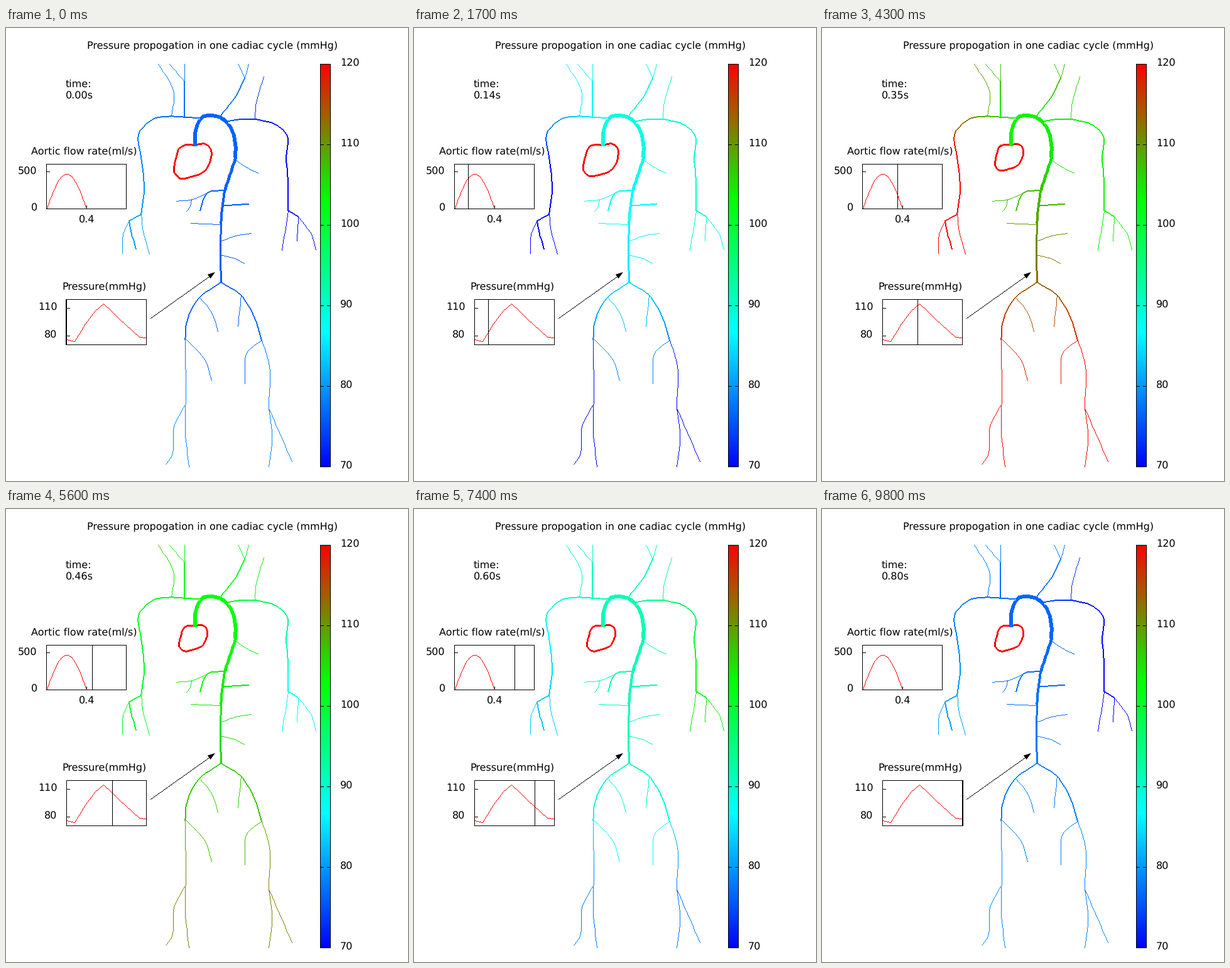
Animation of 640 by 720 pixels, one loop 9900 ms. Source, as a matplotlib script:

```python
import numpy as np
import matplotlib.pyplot as plt
from matplotlib.animation import FuncAnimation
from matplotlib.collections import PolyCollection

W, H, DPI = 640, 720, 80
FRAMES, PERIOD, EJECTION = 99, 0.8, 0.4
LOW, HIGH = 70, 120
RED = (1, 0, 0)

plt.rcParams["font.family"] = "DejaVu Sans"
plt.rcParams["text.hinting"] = "none"
fig = plt.figure(figsize=(W / DPI, H / DPI), dpi=DPI, facecolor="white")
ax = fig.add_axes([0, 0, 1, 1])
ax.axis("off")


def palette(p):
    """Blue, cyan, green, red in three equal linear steps."""
    u = np.clip((np.asarray(p) - LOW) / (HIGH - LOW), 0, 1) * 3
    up, down = np.clip(u, 0, 1), np.clip(u - 2, 0, 1)
    return np.stack([down, up - down, 1 - np.clip(u - 1, 0, 1)], axis=-1)


# ---- crisp strokes made of pixel-aligned bars ----
def bars(pts, width=1):
    """Step along a polyline, one bar across the stroke per pixel."""
    pts = np.floor(np.asarray(pts, float) + 0.5)
    out = []
    for start, end in zip(pts[:-1], pts[1:]):
        dx, dy = np.abs(end - start)
        n = int(max(dx, dy))
        if n == 0:
            continue
        size = max(1, int(width * np.hypot(dx, dy) / n))
        corner = np.floor(np.linspace(start, end, n + 1) + 0.5)
        flat = dx >= dy
        corner[:, 1 if flat else 0] -= size // 2
        w, h = (1, size) if flat else (size, 1)
        out.append(corner[:, None] + np.array([(0, 0), (w, 0), (w, h), (0, h)]))
    return np.concatenate(out) if out else np.empty((0, 4, 2))


def spline(keys, step=7):
    """Points about one step apart on a smooth curve through the keys."""
    k = np.array(keys, float)
    run = np.concatenate([[0], np.cumsum(np.hypot(*np.diff(k, axis=0).T))])
    slope = np.gradient(k, run, axis=0)
    s = np.linspace(0, run[-1], max(2, int(run[-1] / step) + 1))
    i = np.clip(np.searchsorted(run, s, side="right") - 1, 0, len(k) - 2)
    h = (run[i + 1] - run[i])[:, None]
    t = (s - run[i])[:, None] / h
    return ((1 + 2 * t) * (1 - t)**2 * k[i] + t * (1 - t)**2 * h * slope[i]
            + t**2 * (3 - 2 * t) * k[i + 1] + t**2 * (t - 1) * h * slope[i + 1])


def fill_bars(quads, color, zorder):
    patch = PolyCollection(quads, facecolors=color, edgecolors="none",
                           linewidths=0, zorder=zorder)
    ax.add_collection(patch)
    return patch


def line(*pts, color="black", width=1, zorder=3):
    return fill_bars(bars(pts, width), color, zorder)


def box(x0, y0, x1, y1):
    line((x0, y0), (x1, y0), (x1, y1), (x0, y1), (x0, y0), zorder=4)


def label(x, y, s, ha="left"):
    return ax.text(x, y, s, ha=ha, va="baseline", fontsize=16 * 72 / DPI)


# ---- pressure over one cycle at a few sites ----
STEPS = np.arange(FRAMES)
THETA = 2 * np.pi * STEPS / (FRAMES - 1)


def wave(mean, c1, s1, c2, s2):
    """Mean plus the first two harmonics of the heart beat."""
    return (mean + c1 * np.cos(THETA) + s1 * np.sin(THETA)
            + c2 * np.cos(2 * THETA) + s2 * np.sin(2 * THETA))


def mix(a, b, w):
    return a * (1 - w) + b * w


trace = np.array([(97, 495), (109, 498), (126, 470), (141, 450), (155, 438),
                  (167, 449), (180, 462), (200, 480), (212, 491), (223, 492)])

root = wave(92, -13.7, 1.8, -1.8, 0.5)
fork = 80 + 30 * (489 - np.interp(97 + STEPS * 126 / 98, *trace.T)) / 44
ankle = wave(90.2, -23.6, 0.2, 12.2, -9.5)
groin = mix(fork, ankle, 0.3)
neck = wave(93, -13.6, 3.2, -1.3, -2.1)
r_neck = wave(93.7, -15.7, 2.3, 1.2, 0)
l_neck = wave(93.3, -16.4, 4.3, -2.7, 1.6)
r_hand = wave(91.9, -20.7, 0.2, 9.2, -20)
l_hand = wave(92.5, -15.2, 3.9, -15.6, -9.8)
r_shoulder = mix(root, r_hand, 0.15)
l_shoulder = mix(root, l_hand, 0.3)

# ---- vessel tree ----
quads, owners, pressures = [], [], []


def vessel(width, start, end, *keys):
    """Add a curve whose pressure runs from start to end."""
    pts = spline(keys)
    for i in range(len(pts) - 1):
        piece = bars(pts[i:i + 2], width)
        quads.append(piece)
        owners.extend([len(pressures)] * len(piece))
        pressures.append(mix(start, end, (i + 0.5) / (len(pts) - 1)))


def branch(width, site, *keys):
    vessel(width, site, site, *keys)


def aorta_at(w):
    return mix(root, fork, w)


# neck and head
vessel(1, r_shoulder, r_neck, (263, 140), (267, 103), (242, 57))
vessel(2, root, neck, (284, 141), (284, 85))
branch(1, neck, (284, 85), (284, 57))
branch(1, neck, (284, 85), (260, 57))
vessel(2, root, neck, (342, 139), (368, 104), (380, 79))
branch(1, neck, (380, 79), (386, 57))
branch(1, neck, (380, 79), (369, 57))
vessel(1, l_shoulder, l_neck, (396, 145), (397, 125), (410, 77))

# arm on the left side of the picture
vessel(2, root, r_shoulder, (308, 143), (263, 140))
vessel(2, r_shoulder, r_hand, (263, 140), (236, 144), (212, 166), (215, 205),
       (220, 255), (215, 296))
branch(2, r_hand, (215, 296), (196, 306))
branch(1, r_hand, (196, 306), (187, 325), (185, 358))
branch(2, r_hand, (196, 306), (199, 323), (207, 351))
branch(1, r_hand, (215, 296), (217, 318), (228, 359))

# arm on the right side of the picture
vessel(2, root, l_shoulder, (351, 149), (365, 146), (396, 145))
vessel(2, l_shoulder, l_hand, (396, 145), (428, 153), (448, 171), (446, 205),
       (449, 240), (449, 290))
branch(2, l_hand, (449, 290), (465, 300))
branch(1, l_hand, (465, 300), (463, 338))
branch(1, l_hand, (465, 300), (487, 330), (493, 352))
branch(1, l_hand, (449, 290), (446, 310), (439, 353))

# trunk
branch(1, aorta_at(.15), (366, 210), (380, 220), (401, 230))
branch(2, aorta_at(.4), (349, 258), (320, 262), (309, 290))
branch(1, aorta_at(.4), (320, 262), (295, 272), (271, 275))
branch(1, aorta_at(.4), (295, 272), (294, 281), (287, 291))
branch(2, aorta_at(.5), (347, 282), (386, 280))
branch(1, aorta_at(.6), (341, 312), (294, 310))
branch(1, aorta_at(.75), (342, 338), (368, 329), (390, 326))
branch(1, aorta_at(.85), (341, 360), (367, 367), (379, 374))

# legs
thigh, calf = mix(fork, groin, .4), mix(groin, ankle, .4)
vessel(2, fork, groin, (342, 404), (308, 428), (288, 465), (285, 495))
vessel(2, fork, groin, (342, 404), (374, 425), (399, 468), (407, 496))
branch(1, thigh, (308, 428), (325, 448), (337, 482))
branch(1, thigh, (374, 425), (369, 474))
branch(1, groin, (285, 493), (318, 530), (327, 560))
branch(1, groin, (407, 496), (385, 513), (380, 565))
vessel(1, calf, ankle, (285, 495), (286, 597))
branch(1, ankle, (286, 597), (268, 630), (262, 683), (254, 693))
branch(1, ankle, (285, 598), (285, 640), (291, 697))
vessel(1, calf, ankle, (407, 496), (418, 530), (418, 604))
branch(1, ankle, (418, 604), (423, 650), (418, 697))
branch(1, ankle, (418, 604), (455, 689))

# aorta, thinning on its way down
vessel(3, aorta_at(.6), fork, (342, 310), (341, 345), (342, 403))
vessel(4, aorta_at(.4), aorta_at(.6), (348, 258), (345, 280), (342, 310))
vessel(5, aorta_at(.1), aorta_at(.4), (365, 205), (356, 233), (348, 258))
vessel(6, root, aorta_at(.1), (301, 187), (302, 162), (313, 141), (332, 139),
       (357, 157), (365, 180), (365, 205))

pressures = np.array(pressures)
tree = fill_bars(np.concatenate(quads), RED, 3)

# ---- heart ----
HUB = np.array([300, 185])
outline = spline([
    (300, 186), (318, 184), (325, 191), (325, 210), (313, 229), (297, 235),
    (275, 238), (268, 231), (270, 208), (278, 188), (290, 185), (300, 186)])
heart = fill_bars(bars(outline, 3), RED, 2)

# ---- colour bar ----
ax.imshow(palette(np.linspace(HIGH, LOW, 641))[:, None], extent=(500, 517, 698, 57),
          aspect="auto", interpolation="nearest", zorder=1)
box(500, 57, 516, 697)
for value in range(LOW, HIGH + 1, 10):
    y = round(697 - (value - LOW) * 12.8)
    line((500, y), (505, y), zorder=4)
    line((511, y), (516, y), zorder=4)
    label(532, y + 4, str(value))

# ---- small plots ----
box(64, 216, 191, 287)
line((64, 228), (69, 228))
line((128, 287), (128, 282))
phase = np.linspace(0, np.pi, 40)
line(*zip(64.5 + 63.5 * phase / np.pi, 287 - 55.5 * np.sin(phase)), color=RED)
label(39.5, 201, "Aortic flow rate(ml/s)")
label(49.5, 233, "500", "right")
label(50, 291, "0", "right")
label(129, 310, "0.4", "center")

box(96, 431, 223, 503)
for y, s in ((445, "110"), (489, "80")):
    line((96, y), (101, y))
    label(81.5, y + 4, s, "right")
line(*trace, color=RED)
label(89.5, 416, "Pressure(mmHg)")

# ---- arrow and headings ----
tail, tip = np.array([230, 461]), np.array([333, 388])
along = (tip - tail) / np.hypot(*(tip - tail))
side = np.array([-along[1], along[0]])
base = tip - 12 * along
line(tail, base)
ax.fill(*zip(tip, base + 4 * side, base - 4 * side), color="black", lw=0)
label(329, 33, "Pressure propogation in one cadiac cycle (mmHg)", "center")
label(94.5, 94, "time:")

clock = label(94.5, 113, "")
flow_cursor = line((64, 216), (64, 287), zorder=4)
pressure_cursor = line((95, 431), (95, 503), zorder=4)

ax.set_xlim(0, W)
ax.set_ylim(H, 0)


def update(n):
    t = n * PERIOD / (FRAMES - 1)
    ejected = (1 - np.cos(np.pi * min(t / EJECTION, 1))) / 2
    heart.set_verts(bars(HUB + (outline - HUB) * (1 - 0.245 * ejected), 3))
    tree.set_facecolor(palette(pressures[:, n])[owners])
    clock.set_text(f"{t:.2f}s")
    x = int(64.5 + n * 127 / 98)
    flow_cursor.set_verts(bars([(x, 216), (x, 287)]))
    x = int(95.7 + 1.313 * n)
    pressure_cursor.set_verts(bars([(x, 431), (x, 503)]))
    return tree, heart, clock, flow_cursor, pressure_cursor


anim = FuncAnimation(fig, update, frames=FRAMES, interval=100, repeat=True,
                     repeat_delay=0)
plt.show()
```
